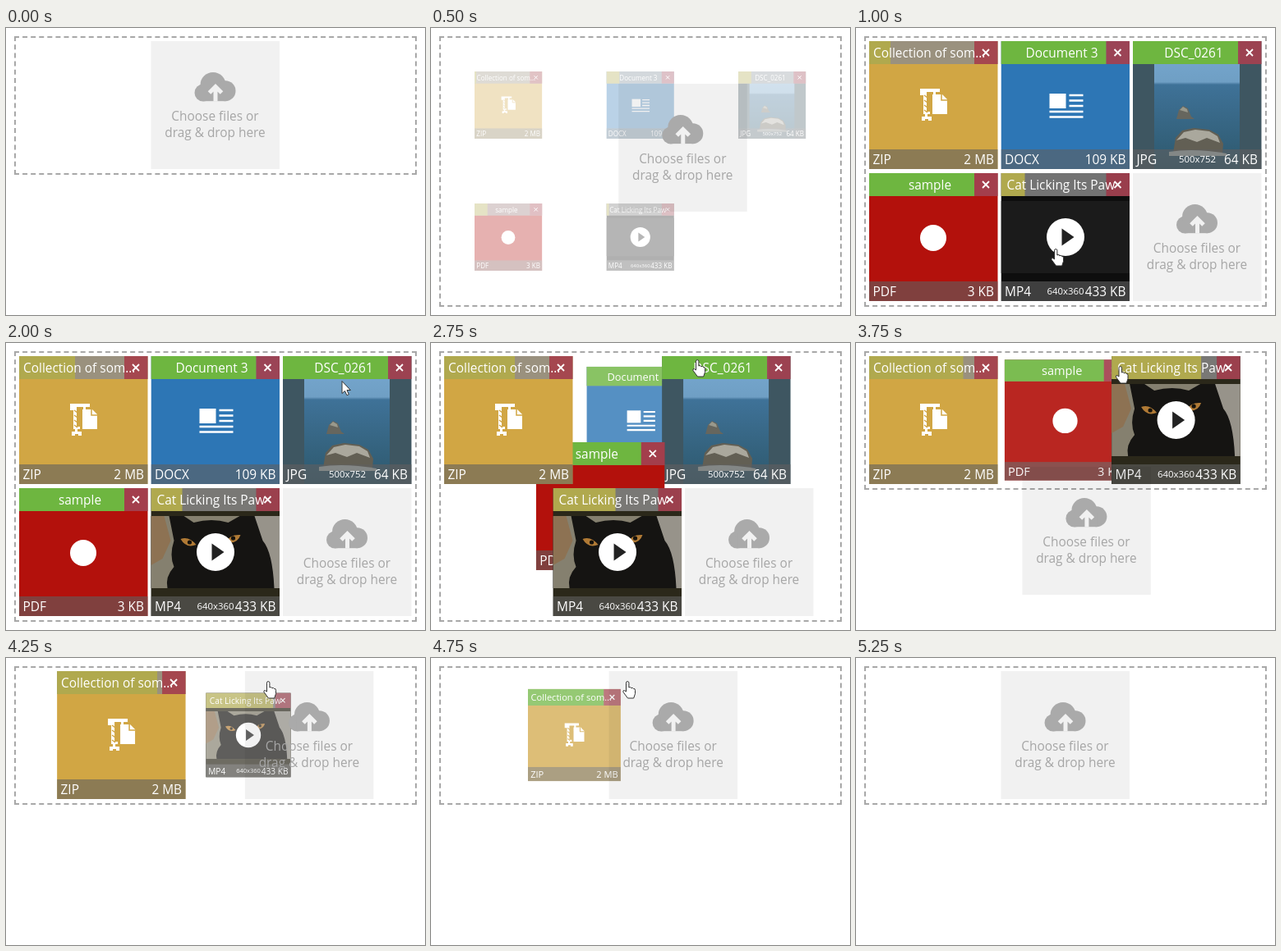
An HTML page that plays this animation: 510x350 px, repeating every 5.5 s.

```html
<!DOCTYPE html>
<html lang="en">
<head>
<meta charset="utf-8">
<title>File upload</title>
<style>
html, body { margin: 0; width: 100%; height: 100%; overflow: hidden; background: #fff; }
#box { position: absolute; left: 10px; top: 10px; width: 490px; box-sizing: border-box; border: 2px dashed #a8a8a8; }
svg { position: absolute; left: 0; top: 0; }
text { font: 15.4px "Open Sans", "Noto Sans", sans-serif; fill: #fff; }
.mid { text-anchor: middle; }
.end { text-anchor: end; }
.dim { font-size: 11.4px; }
.hint { fill: #a6a6a6; text-anchor: middle; }
</style>
</head>
<body>
<div id="box"></div>
<svg id="stage" width="510" height="350" viewBox="0 0 510 350">
  <defs>
    <clipPath id="tile"><rect width="156.5" height="156"/></clipPath>
    <linearGradient id="sea" x2="0" y2="1">
      <stop offset="0" stop-color="#78a9d2"/>
      <stop offset=".32" stop-color="#6f9fc4"/>
      <stop offset=".34" stop-color="#3f7298"/>
      <stop offset="1" stop-color="#2d586c"/>
    </linearGradient>
  </defs>
</svg>
<script>
const LOOP = 5500, STEP = 250, DUR = 310;
const SIZE = 156, PITCH_X = 160.5, PITCH_Y = 161;
const stage = document.getElementById("stage");
const box = document.getElementById("box");

const zipArt = `<g fill="#fff">
  <path d="M62 58h24v4h-5v4h-3v-4h-8v24h4v3h-3v3h5v5h-4v-2h-4v2h-4v-5h4v-3h-2V66h-4z"/>
  <path d="M77 65h12l6 6v18H77z"/></g>
  <path d="M88 65v7h7M67 66l4 3M67 72l4 3M67 78l4 3M67 84l4 3" fill="none" stroke="#d1a644" stroke-width="1.5"/>`;

const docArt = `<rect x="59" y="64" width="20" height="18" fill="#fff"/>
  <path d="M83 66h17M83 72.5h17M83 79h17M59 86h41M59 92.5h41" stroke="#fff" stroke-width="2.5"/>`;

const photoArt = `<rect x="26" width="104" height="156" fill="url(#sea)"/>
  <path d="M53 95l3-11 5-5 6 3 4 10 4 3z" fill="#66665e"/>
  <path d="M57 84l4-4 5 3 1 4z" fill="#99998c"/>
  <path d="M49 136l3-18 8-9 14-3 19 2 11 6 6 11-1 13z" fill="#625f54"/>
  <path d="M53 121l9-10 14-3 17 2 10 6 3 8-16-6-12 5-14-5z" fill="#aaa89d"/>
  <path d="M44 135q30-5 70 2v3H44z" fill="#b9c3c2"/>`;

const pdfArt = `<circle cx="78" cy="79" r="16" fill="#fff"/>`;

const catArt = `<rect y="34" width="157" height="88" fill="#1b1b1b"/>
  <g id="cat"><rect width="157" height="156" fill="#2b281a"/>
    <rect y="34" width="157" height="88" fill="#85806f"/>
    <path d="M0 34h16l8 30-10 22-14 8z" fill="#8d7253"/>
    <path d="M112 34h45v88h-12z" fill="#97938a"/>
    <path d="M20 122q-3-14 8-26-6-14 0-32l-6-30h18l12 8q22-6 42 0l14-8h18l10 30q12 14 14 58z" fill="#151412"/>
    <path d="M36 62q10-4 19 7-12 5-19-7zM91 66q5-10 18-9-4 12-18 9z" fill="#b07a35"/>
    <circle cx="47" cy="66" r="2.6" fill="#15120c"/><circle cx="100" cy="61" r="2.6" fill="#15120c"/>
  </g>
  <circle cx="78.5" cy="78" r="23" fill="#fff"/><path d="M74 67.5v21l15-10.5z" fill="#222"/>`;

const files = {
  doc: { name: "Document 3", type: "DOCX", size: "109 KB", fill: "#2d76b5", art: docArt },
  jpg: { name: "DSC_0261", type: "JPG", size: "64 KB", dim: "500x752", fill: "#3e5661", art: photoArt },
  pdf: { name: "sample", type: "PDF", size: "3 KB", fill: "#b3110c", art: pdfArt },
  zip: { name: "Collection of som…", left: 5, type: "ZIP", size: "2 MB", fill: "#d1a644", art: zipArt,
    load: [[500, 4], [1000, 26], [2000, 68], [2750, 86], [3250, 107], [4250, 122], [4500, 128]] },
  mp4: { name: "Cat Licking Its Paw", left: 7, type: "MP4", size: "433 KB", dim: "640x360", fill: "#0e0e0e", art: catArt,
    load: [[500, 6], [1000, 29], [2000, 38], [2750, 76], [3250, 94], [4250, 124]] }
};
const quickLoad = [[500, 30], [750, 128]];

const fileTile = f => `<g clip-path="url(#tile)">
  <rect width="157" height="156" fill="${f.fill}"/>${f.art}
  <rect width="157" height="28" fill="#8c8c8c" opacity=".8"/>
  <rect class="bar" height="28"/>
  <rect x="128" width="29" height="28" fill="#aa283c" opacity=".7"/>
  <text ${f.left ? `x="${f.left}"` : 'x="74" class="mid"'} y="20">${f.name}</text>
  <path d="M138 10l8 8m0-8l-8 8" stroke="#fff" stroke-width="1.8"/>
  <rect y="132" width="157" height="24" fill="#5f5f5f" opacity=".6"/>
  <text x="4.5" y="150">${f.type}</text>
  <text x="152" y="150" class="end">${f.size}</text>
  ${f.dim ? `<text x="78.5" y="148" class="mid dim">${f.dim}</text>` : ""}</g>`;

const addTile = `<rect width="156.5" height="156" opacity=".055"/>
  <g fill="#aaa"><circle cx="63.5" cy="63" r="10.5"/><circle cx="75.5" cy="53.5" r="15.5"/>
  <circle cx="90.5" cy="60.7" r="12.5"/><path d="M63 55h28v18.2H63z"/></g>
  <path d="M71 63l7.5-7.5L86 63M78.5 57v16.5" fill="none" stroke="#f1f1f1" stroke-width="5"/>
  <text class="hint" x="78" y="97">Choose files or</text>
  <text class="hint" x="78" y="117">drag &amp; drop here</text>`;

const addGroup = html => {
  const g = document.createElementNS("http://www.w3.org/2000/svg", "g");
  g.innerHTML = html;
  return stage.appendChild(g);
};

const tiles = {};
for (const id in files) tiles[id] = addGroup(fileTile(files[id]));
tiles.add = addGroup(addTile);
const cat = document.getElementById("cat");

const outline = 'fill="#fff" stroke="#333" stroke-width="1" stroke-linejoin="round"';
const arrow = addGroup(`<path d="M.5.5v15l3.5-3 2.4 5.2 2.4-1-2.3-5.2h4.4z" ${outline}/>`);
const hand = addGroup(`<path d="M4.5 13V2.3a1.7 1.7 0 0 1 3.4 0V8q1.7-1.2 3 .7 1.7-1 2.6.8 2-.6 2 1.8v4.2L13.7 21H6.5L1 13.6q-.6-2.4 1.5-2z" ${outline}/>`);

const cursorX = [[750, 290], [1000, 237], [1500, 237], [2000, 408.5], [2500, 318], [3250, 318], [4250, 313], [4500, 233], [4750, 233], [5000, 429]];
const cursorY = [[750, 225], [1000, 269], [1500, 269], [2000, 46], [2500, 20], [2750, 20], [3250, 28], [4750, 28], [5000, 250]];

// Each layout change moves tiles from one list order to the next.
const changes = [];
let list = ["zip", "doc", "jpg", "pdf", "mp4", "add"];
changes.push({ at: 400, from: ["add"], to: list });
for (const [id, at] of [["doc", 2642], ["jpg", 3002], ["pdf", 3700], ["mp4", 4072], ["zip", 4595]]) {
  const next = list.filter(k => k !== id);
  changes.push({ at, from: list, to: next });
  list = next;
}

const lerp = (a, b, p) => a + (b - a) * p;

function track(points, t) {
  let i = points.findIndex(p => p[0] > t);
  if (i < 0) return points[points.length - 1][1];
  if (i === 0) return points[0][1];
  const [t0, a] = points[i - 1], [t1, b] = points[i];
  return lerp(a, b, (t - t0) / (t1 - t0));
}

function slot(order, id) {
  const i = order.indexOf(id);
  if (i < 0) return null;
  const row = Math.floor(i / 3), count = Math.min(3, order.length - row * 3);
  return [16 + (i % 3 + (3 - count) / 2) * PITCH_X, 16 + row * PITCH_Y];
}

function placeTile(id, change, p) {
  const a = slot(change.from, id), b = slot(change.to, id);
  const g = tiles[id];
  let scale = 1, alpha = 1, x, y;
  if (a && b) {
    x = lerp(a[0], b[0], p);
    y = lerp(a[1], b[1], p);
  } else if (a) {
    [x, y] = a;
    if (id === "mp4") x += 70 * p;
    scale = 1 - 0.76 * p ** 1.45;
    alpha = p < 1 ? 1 - 0.55 * p : 0;
  } else if (b) {
    [x, y] = b;
    scale = lerp(0.3, 1, p);
    alpha = p;
  } else alpha = 0;
  g.style.display = alpha ? "" : "none";
  if (!alpha) return;
  const inset = SIZE / 2 * (1 - scale);
  g.setAttribute("transform", `translate(${x + inset} ${y + inset}) scale(${scale})`);
  g.setAttribute("opacity", alpha);
}

function render(t) {
  const change = changes.filter(c => c.at <= t).pop() || { at: 0, from: ["add"], to: ["add"] };
  const p = Math.min(1, (t - change.at) / DUR);
  for (const id in tiles) placeTile(id, change, p);
  box.style.height = (change.to.length > 3 ? 330 : 169) + "px";

  for (const id in files) {
    const w = track(files[id].load || quickLoad, t);
    const bar = tiles[id].querySelector(".bar");
    bar.setAttribute("width", w);
    bar.setAttribute("fill", w < 128 ? "#b0a94e" : "#6eb640");
  }
  cat.style.display = t >= 1250 ? "" : "none";

  const shown = t >= 750 && t < 5250;
  const pointing = (t >= 1000 && t < 1750) || (t >= 2500 && t < 5000);
  const spot = `translate(${track(cursorX, t)} ${track(cursorY, t)})`;
  for (const [g, on] of [[hand, pointing], [arrow, !pointing]]) {
    g.style.display = shown && on ? "" : "none";
    g.setAttribute("transform", spot);
  }
}

const start = performance.now();
function tick() {
  const t = (performance.now() - start) % LOOP;
  render(Math.floor(t / STEP) * STEP);
  requestAnimationFrame(tick);
}
tick();
</script>
</body>
</html>
```
